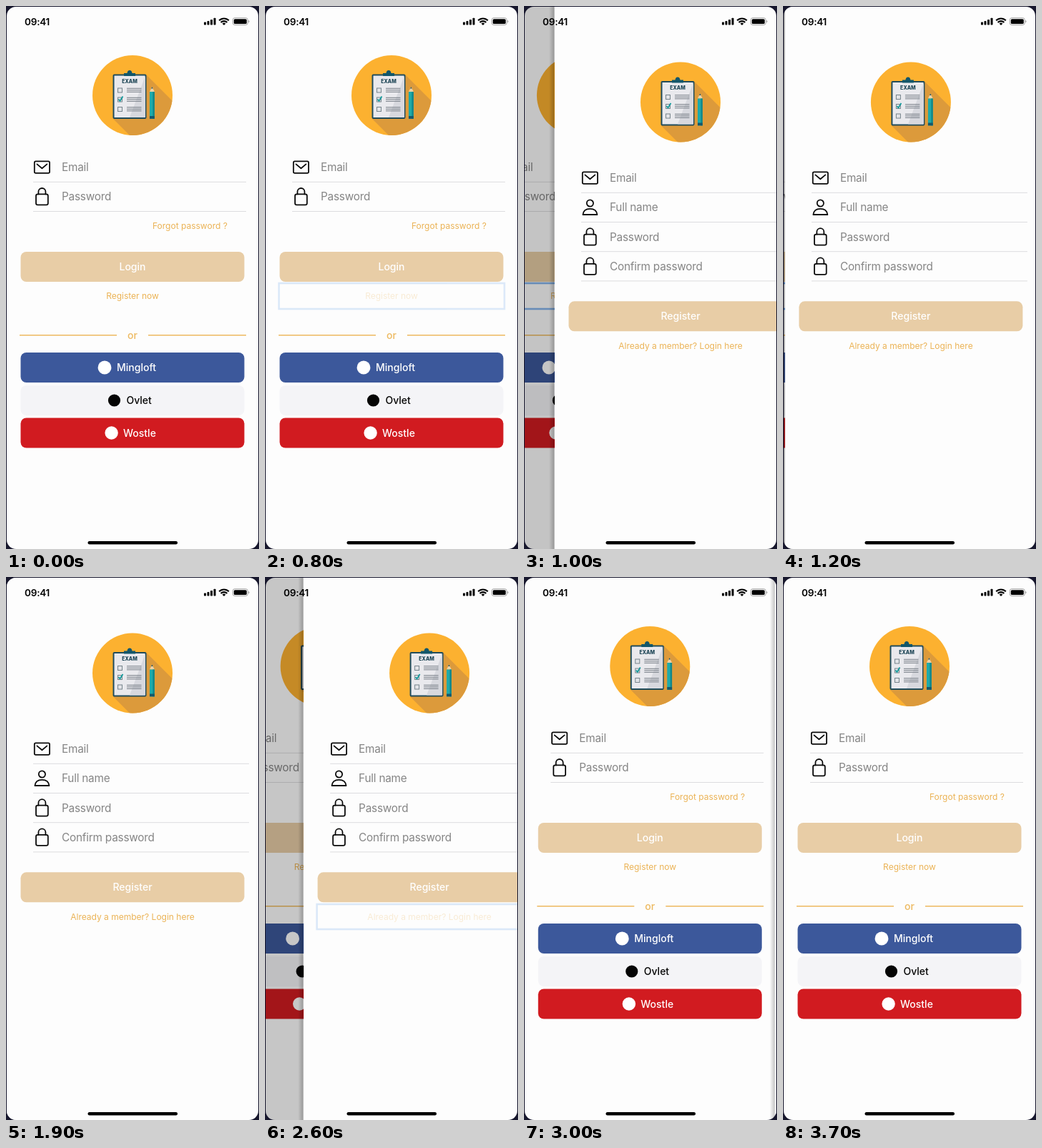
Animation of 354x760 px, one loop 3.8 s. Source, as an HTML page:

```html
<!DOCTYPE html>
<html lang="en">
<head>
<meta charset="utf-8">
<title>Login and register</title>
<style>
  html, body { margin: 0; width: 100%; height: 100%; overflow: hidden; background: #17172d; }
  svg { display: block; width: 100vw; height: 100vh; }
  text { font-family: Inter, Roboto, sans-serif; }
  .hint { font-size: 15.3px; letter-spacing: -.2px; fill: #858585; }
  .link { font-size: 12px; fill: #ebb355; }
  .label { font-size: 14px; font-weight: 500; }
  .mid { text-anchor: middle; }
  .icon { fill: none; stroke: #0b0b0b; stroke-width: 1.8; stroke-linecap: round; stroke-linejoin: round; }
</style>
</head>
<body>
<svg id="stage" viewBox="0 0 354 760" preserveAspectRatio="none"></svg>
<script>
const LOOP = 3800, STEP = 100, WIDTH = 353, PARALLAX = 117;
const PUSH = { start: 800, rate: 18.35, press: 650 };
const POP = { start: 2558, rate: 16.3, press: 2450 };

const rect = (x, y, w, h, fill, r = 0) =>
  `<rect x="${x}" y="${y}" width="${w}" height="${h}" rx="${r}" fill="${fill}"/>`;
const line = (x1, x2, y, color, w = 1) =>
  `<path d="M${x1} ${y}H${x2}" stroke="${color}" stroke-width="${w}"/>`;
const text = (x, y, str, cls, fill = '') =>
  `<text x="${x}" y="${y}" class="${cls}"${fill && ` style="fill:${fill}"`}>${str}</text>`;

// Icons are drawn around the centre of their row.
const icons = {
  mail: '<rect x="-10.6" y="-8.4" width="21.2" height="16.4" rx="1.8"/><path d="M-7-4.4L0 1.4L7-4.4"/>',
  lock: '<rect x="-8.4" y="-3.6" width="16.8" height="15" rx="2.4"/><path d="M-5-3.6V-7A5 5 0 0 1 5-7V-3.6"/>',
  user: '<circle cy="-6" r="4.6"/><path d="M-10 10C-9.4 4.4-5.4 1.8 0 1.8S9.4 4.4 10 10Z"/>'
};

const field = (y, icon, label, end) => `
  <g class="icon" transform="translate(50.4 ${y})">${icons[icon]}</g>
  ${text(78, y + 5.4, label, 'hint')}
  ${line(38, end, y + 20.5, '#dcdcdf')}`;

const button = (y, fill) => rect(20.5, y, 313, 42, fill, 8);

const social = (y, fill, ink, dot, r, x, name) => button(y, fill) +
  `<circle cx="${dot}" cy="${y + 21}" r="${r}" fill="${ink}"/>` +
  text(x, y + 26, name, 'label', ink);

const pressable = (id, y, h, label) => `
  <g id="${id}">
    ${text(177, y + h / 2 + 4.4, label, 'link mid')}
    <rect id="${id}Ring" x="19.5" y="${y}" width="315.5" height="${h}" fill="none" stroke="#70a9ea" stroke-width="2.6"/>
  </g>`;

const checkRow = y => `
  <rect x="-20.5" y="${y}" width="6" height="6" fill="#e2e3e7" stroke="#76848c" stroke-width="1"/>
  ${[0.3, 2.8, 5.3].map(d => line(-8, 12.5, y + d, '#747b84', 1)).join('')}`;

const badge = cy => `
  <g transform="translate(177 ${cy})">
    <circle r="56" fill="#fcb130"/>
    <path clip-path="url(#disc)" d="M19-29L80 32V80H20L-27 33Z" fill="#dc9a3b"/>
    <rect x="-26.5" y="-28.5" width="45" height="60.5" rx="1" fill="#e9e9ed" stroke="#204c5c" stroke-width="2"/>
    <path d="M18-27.5V31H-4Z" fill="#d7d8de"/>
    <path d="M-12-27V-31H-7.5Q-7-35-4-35T-.5-31H4V-27Z" fill="#12566a"/>
    <text x="-4" y="-17.4" class="mid" font-size="7" font-weight="800" fill="#1d4556">EXAM</text>
    ${[-10, 3, 16.5].map(checkRow).join('')}
    <path d="M-19.5 5.5L-17.5 8L-13.5 1.5" fill="none" stroke="#149b9c" stroke-width="1.8"/>
    <path d="M24-5L27.3-12L30.8-5Z" fill="#ead2a8"/>
    <path d="M26.2-9.5L27.3-12L28.5-9.5Z" fill="#174b5a"/>
    ${rect(24, -5, 6.8, 37.8, '#1eabaa')}
    ${rect(28.4, -5, 2.4, 37.8, '#138689')}
    ${rect(24, 29, 6.8, 3.8, '#17576a')}
  </g>`;

const page = '#fdfdfd', tan = '#e8cda6', gold = '#edb95f';

const login = rect(0, 0, 355, 760, page) + badge(125) +
  field(225.8, 'mail', 'Email', 336) +
  field(267, 'lock', 'Password', 336) +
  text(205, 312.3, 'Forgot password ?', 'link') +
  button(344, tan) + text(177, 370, 'Login', 'label mid', '#fff') +
  pressable('join', 388, 36, 'Register now') +
  line(19, 155, 460.7, gold, 1.4) + line(199, 336, 460.7, gold, 1.4) +
  text(177, 466, 'or', 'label mid', gold) +
  social(485, '#3c589b', '#fff', 138, 9.4, 155, 'Mingloft') +
  social(531, '#f4f4f7', '#050505', 151.5, 8.6, 168.5, 'Ovlet') +
  social(576.5, '#d11b20', '#fff', 147.6, 9.2, 164, 'Wostle');

const register = rect(-7, 0, 7, 760, 'url(#edge)') + rect(1, 0, 360, 760, page) + badge(134.5) +
  field(240.8, 'mail', 'Email', 340) +
  field(282, 'user', 'Full name', 340) +
  field(323.2, 'lock', 'Password', 340) +
  field(364.4, 'lock', 'Confirm password', 340) +
  button(413.3, tan) + text(177, 439.4, 'Register', 'label mid', '#fff') +
  pressable('back', 458, 35, 'Already a member? Login here');

const bars = [4, 5.6, 7.6, 9.8].map((h, i) => rect(277 + i * 4.5, 26.6 - h, 3, h, '#000', 0.8)).join('');

const status = `
  <text x="26" y="26.6" font-size="13.5" font-weight="600" letter-spacing="-.2">09:41</text>
  ${bars}
  <g fill="none" stroke="#000" stroke-width="2.1">
    <path d="M298.2 20.3A9.6 9.6 0 0 1 311.8 20.3M300.6 23A6.2 6.2 0 0 1 309.4 23"/>
    <path d="M302.6 24.6A3.4 3.4 0 0 1 307.4 24.6L305 27Z" fill="#000" stroke="none"/>
  </g>
  <rect x="317.3" y="16.7" width="21" height="9.8" rx="2.8" fill="none" stroke="#999" stroke-width=".9"/>
  ${rect(318.8, 18.2, 18, 6.8, '#000', 1.6)}
  <path d="M339.5 19.8Q341.6 21.6 339.5 23.4Z" fill="#888"/>
  ${rect(114.5, 749, 125.5, 4.4, '#000', 2.2)}`;

const $ = id => document.getElementById(id);

$('stage').innerHTML = `
  <defs>
    <clipPath id="screen"><rect x="1" y="1" width="352" height="759" rx="13"/></clipPath>
    <clipPath id="disc"><circle r="56"/></clipPath>
    <linearGradient id="edge">
      <stop stop-color="#000" stop-opacity="0"/><stop offset="1" stop-color="#000" stop-opacity=".22"/>
    </linearGradient>
  </defs>
  ${rect(0, 0, 354, 760, '#17172d')}
  <g clip-path="url(#screen)">
    <g id="login">${login}</g>
    <rect id="dim" width="354" height="760"/>
    <g id="register">${register}</g>
    ${status}
  </g>`;

// Remaining distance of a critically damped spring.
function spring(t, { start, rate }) {
  const s = Math.max(0, t - start) / 1000 * rate;
  return (1 + s) * Math.exp(-s);
}

function pressOpacity(t, start) {
  const d = t - start, low = 0.24;
  if (d <= 0 || d >= 400) return 1;
  if (d < 100) return 1 - (1 - low) * d / 100;
  return low + (1 - low) * Math.max(0, d - 150) / 250;
}

function setPress(id, t, from, until) {
  $(id).setAttribute('opacity', pressOpacity(t, from));
  $(id + 'Ring').setAttribute('visibility', t >= from && t < until ? 'visible' : 'hidden');
}

function draw(time) {
  const t = Math.floor(time % LOOP / STEP) * STEP;
  const shown = t < POP.start ? 1 - spring(t, PUSH) : spring(t, POP);
  $('login').setAttribute('transform', `translate(${-PARALLAX * shown} 0)`);
  $('register').setAttribute('transform', `translate(${WIDTH * (1 - shown)} 0)`);
  $('register').setAttribute('visibility', shown > 0.001 ? 'visible' : 'hidden');
  $('dim').setAttribute('opacity', 0.26 * shown);
  setPress('join', t, PUSH.press, 2000);
  setPress('back', t, POP.press, shown > 0.001 ? 3300 : 0);
}

const begin = performance.now();
function tick() {
  draw(performance.now() - begin);
  requestAnimationFrame(tick);
}
tick();
</script>
</body>
</html>
```
